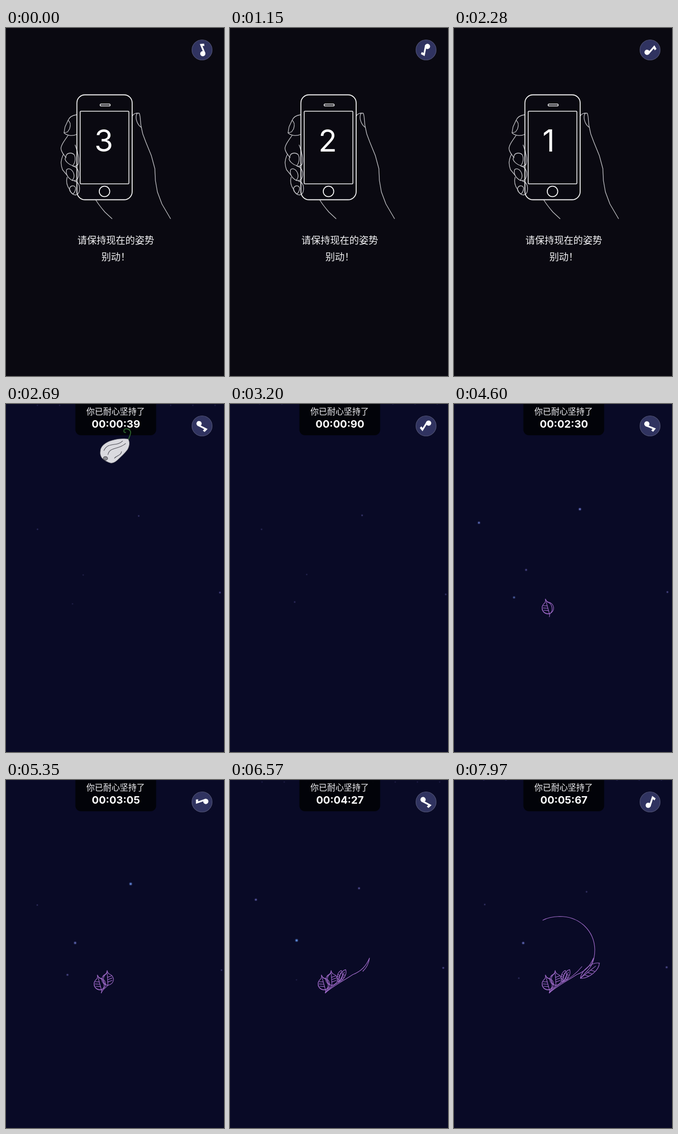
An HTML page for the animation above (8000 ms loop, 432 by 690 pixels).

```html
<!DOCTYPE html>
<html lang="zh-CN">
<head>
<meta charset="utf-8">
<style>
html, body { margin: 0; width: 100%; height: 100%; overflow: hidden; background: #0a0911; }
svg { display: block; width: 432px; height: 690px; }
.line { fill: none; stroke-linecap: round; stroke-linejoin: round; }
.cjk { font-family: "Noto Sans CJK SC", "Noto Sans CJK", sans-serif; fill: #f4f4f6; text-anchor: middle; }
.num { font-family: Inter, sans-serif; fill: #fff; }
</style>
</head>
<body>
<svg viewBox="0 0 432 690">
  <g id="intro">
    <rect width="432" height="690" fill="#0a0911"/>
    <g class="line" stroke="#c4c4c8" stroke-width="1.3">
      <path d="M140 172C131 173 126 176 123 183L117 196L115 208C120 213 131 215 140 211M123 183C129 187 128 194 126 200L122 206L115 208"/>
      <path d="M123 213C116 223 109 232 109 239C109 245 114 251 119 257M137 232C142 244 146 261 143 270C140 274 136 275 132 273"/>
      <path d="M120 251C124 247 131 247 135 251C139 258 137 268 132 273C123 270 118 264 117 260Z"/>
      <path d="M114 250C108 262 108 270 112 281L121 292M131 302C139 304 143 300 144 292C145 281 139 275 133 274"/>
      <path d="M120 281C124 277 131 280 134 288C136 294 134 299 131 302C122 297 118 289 120 281"/>
      <path d="M121 296C119 304 120 312 126 320C128 326 132 331 138 331C145 330 147 322 145 312C143 307 140 304 136 304"/>
      <path d="M126 318C128 312 135 311 138 317C138 323 135 327 133 329C127 326 125 323 126 318"/>
      <path d="M250 175C252 170 258 168 264 169C267 175 266 188 268 196L271 210L277 226L288 253L295 279L296 302L300 325L309 349L326 378"/>
      <path d="M260 169C255 176 259 191 268 197M178 341C184 351 190 358 196 365L210 378"/>
    </g>
    <g fill="none" stroke="#f4f4f4" stroke-width="1.8">
      <rect x="140.5" y="132.5" width="109.5" height="208" rx="16"/>
      <rect x="147" y="165" width="96.5" height="144" rx="1.5" stroke-width="1.6"/>
      <rect x="186.5" y="150.8" width="20" height="3.8" rx="1.9" stroke-width="1.5"/>
      <circle cx="195.2" cy="324" r="10.4"/>
    </g>
    <text id="count" class="num" x="175.3" y="245" font-size="60"></text>
    <g class="cjk" font-size="19">
      <text x="217.5" y="428.3">请保持现在的姿势</text>
      <text x="217.5" y="460.8">别动！</text>
    </g>
  </g>
  <g id="game">
    <rect width="432" height="690" fill="#090a26"/>
    <g id="stars"></g>
    <g id="art" class="line" stroke="#a06bca" stroke-width="1.15"></g>
    <rect x="137.5" y="-12" width="160" height="74" rx="11" fill="#020306" fill-opacity=".9"/>
    <g id="bulb">
      <path class="line" d="M241 75C243 69 247 62 247 57C246 50 237 48 234 52C233 55 234 58 237 57" stroke="#2f6a2f" stroke-width="1.8"/>
      <path d="M187 94C187 84 199 75 213 72C223 69 235 69 242 70C246 76 245 84 241 91C236 98 229 104 223 110C218 115 213 118 208 118C200 116 195 112 191 109C187 104 186 99 187 94Z" fill="#dadadf" stroke="#505058" stroke-width=".8"/>
      <path class="line" d="M194 93C203 75 219 86 231 74M202 101C206 85 222 92 237 79M215 108C220 102 227 104 229 95" stroke="#4c4c54" stroke-width="1.1"/>
      <ellipse cx="197" cy="108.5" rx="4.3" ry="3.5" fill="#8c8c92" stroke="#3c3c42"/>
    </g>
    <text class="cjk" x="217.3" y="21.4" font-size="16.6">你已耐心坚持了</text>
    <text id="clock" class="num" x="217.8" y="47" font-size="20.6" font-weight="700" text-anchor="middle"></text>
  </g>
  <g transform="translate(388.5 43.5)">
    <circle r="20" fill="#303360" stroke="#4e5070" stroke-width="1.2"/>
    <g id="note" fill="#fff">
      <circle cx="-.8" cy="7.5" r="5.2"/>
      <path d="M1 8L-.6 -12.6L7.6 -10.6L7 -6.2L3.2 -7.2L4.4 8Z"/>
    </g>
  </g>
</svg>
<script>
const LOOP = 8000, START = 2300, SWITCH = 2340;
const $ = id => document.getElementById(id);
const clamp = (v, a = 0, b = 1) => Math.min(b, Math.max(a, v));
const pad = n => String(n).padStart(2, '0');

function add(parent, tag, attrs = {}) {
  const el = document.createElementNS('http://www.w3.org/2000/svg', tag);
  for (const k in attrs) el.setAttribute(k, attrs[k]);
  return parent.appendChild(el);
}

// Stars sway along a diagonal and glow most at its upper left end
function star(x, y, swing, period, peak, glow) {
  const g = add($('stars'), 'g');
  const halo = add(g, 'circle', { opacity: .35 }), core = add(g, 'circle');
  return t => {
    const off = -swing * Math.cos(2 * Math.PI * (t - peak) / period);
    const light = clamp(glow - off * .035, .2, .95);
    const blue = clamp((-off - 4) / 5);
    const r = .75 + light * 1.15;
    g.setAttribute('transform', `translate(${x + off} ${y + off})`);
    g.setAttribute('opacity', light);
    g.setAttribute('fill', `rgb(${125 - 25 * blue},${118 + 32 * blue},${210 + 25 * blue})`);
    core.setAttribute('r', r);
    halo.setAttribute('r', r * 1.8);
  };
}

const stars = [
  star(255, 214, 8, 5000, 5250, .65),
  star(55.7, 241.7, 8.2, 2700, 4300, .55),
  star(142.5, 328.5, 10.5, 8000, 6650, .6),
  star(126, 390.5, 7, 4800, 4640, .42),
  star(424, 374, 3.5, 2000, 4200, .5),
];
for (let x = 58; x < 432; x += 44) stars.push(star(x, -1.5, 6, 4800, 4500, .35));

// Leaf growing upwards from its base: outline, midrib, veins on one side
function leaf(x, y, angle, len, width, veinSide, round) {
  const half = w => round
    ? `M0 0C${1.3 * w} ${-.05 * len} ${1.5 * w} ${-.6 * len} ${.3 * w} ${-.78 * len}Q0 ${-.87 * len} 0 ${-len}`
    : `M0 0C${1.3 * w} ${-.25 * len} ${1.3 * w} ${-.8 * len} 0 ${-len}`;
  const paths = [half(-width), `M0 0V${-.8 * len}`, half(width)];
  if (round) paths.push(half(-veinSide * width * .72));
  for (let i = 1; i <= 3; i++) {
    const vy = -len * (.06 + .16 * i);
    paths.push(`M0 ${vy}L${veinSide * width * .85} ${vy - len * .1}`);
  }
  return paths.map(d => ({ d, transform: `translate(${x} ${y}) rotate(${angle})` }));
}

// Each stage is drawn at constant speed until the next one begins
const stage = (from, to, ...parts) => {
  let total = 0;
  const lines = parts.flat().map(p => {
    const el = add($('art'), 'path', typeof p === 'string' ? { d: p } : p);
    const len = el.getTotalLength();
    el.setAttribute('stroke-dasharray', `${len} ${len + 9}`);
    const at = total;
    total += len;
    return { el, len, at };
  });
  return t => {
    const pen = total * clamp((t - from) / (to - from));
    for (const { el, len, at } of lines) {
      el.style.display = pen > at ? '' : 'none';
      el.setAttribute('stroke-dashoffset', len - clamp(pen - at, 0, len));
    }
  };
};

const stages = [
  stage(3800, 5350,
    'M174.5 402C174 412 181 417 190 415.5L189 422',
    leaf(189, 416, -15, 30, 10.5, -1, true),
    'M189 422C191 415 198 412 202 407',
    leaf(202, 407, -3, 29, 10.5, 1, true)),
  stage(5350, 6570,
    'M189 422C198 412 208 405 215 401',
    leaf(214.5, 401, 14, 24, 5, -1),
    leaf(216.5, 400, 28, 27, 5, 1),
    'M189 422C205 408 225 398 243 386C261 379 270 368 276.5 353C275 363 270 373 263.5 379'),
  stage(6570, 7970,
    'M263.5 379C260 382 255 389 250.5 393',
    leaf(250.5, 393, 51.5, 48, 8.5, 1),
    'M213 402C231 393 243 383 253.5 370',
    'M271 369C277 360 279 347 279 336C278 300 250 270.5 209 270.5C196 271 185 273 176 278'),
];

function render(t) {
  const playing = t >= SWITCH;
  $('intro').style.display = playing ? 'none' : '';
  $('game').style.display = playing ? '' : 'none';
  $('note').setAttribute('transform', `rotate(${-18 + t * .1857})`);
  $('count').textContent = 3 - Math.floor(clamp(t + 690, 0, 2999) / 1000);
  const h = Math.floor(Math.max(0, t - START) / 10);
  $('clock').textContent = `00:${pad(Math.floor(h / 100))}:${pad(h % 100)}`;
  $('bulb').setAttribute('transform', `translate(0 ${(2690 - t) * .7})`);
  for (const draw of [...stars, ...stages]) draw(t);
}

const begin = performance.now();
function tick() {
  render((performance.now() - begin) % LOOP);
  requestAnimationFrame(tick);
}
tick();
</script>
</body>
</html>
```
